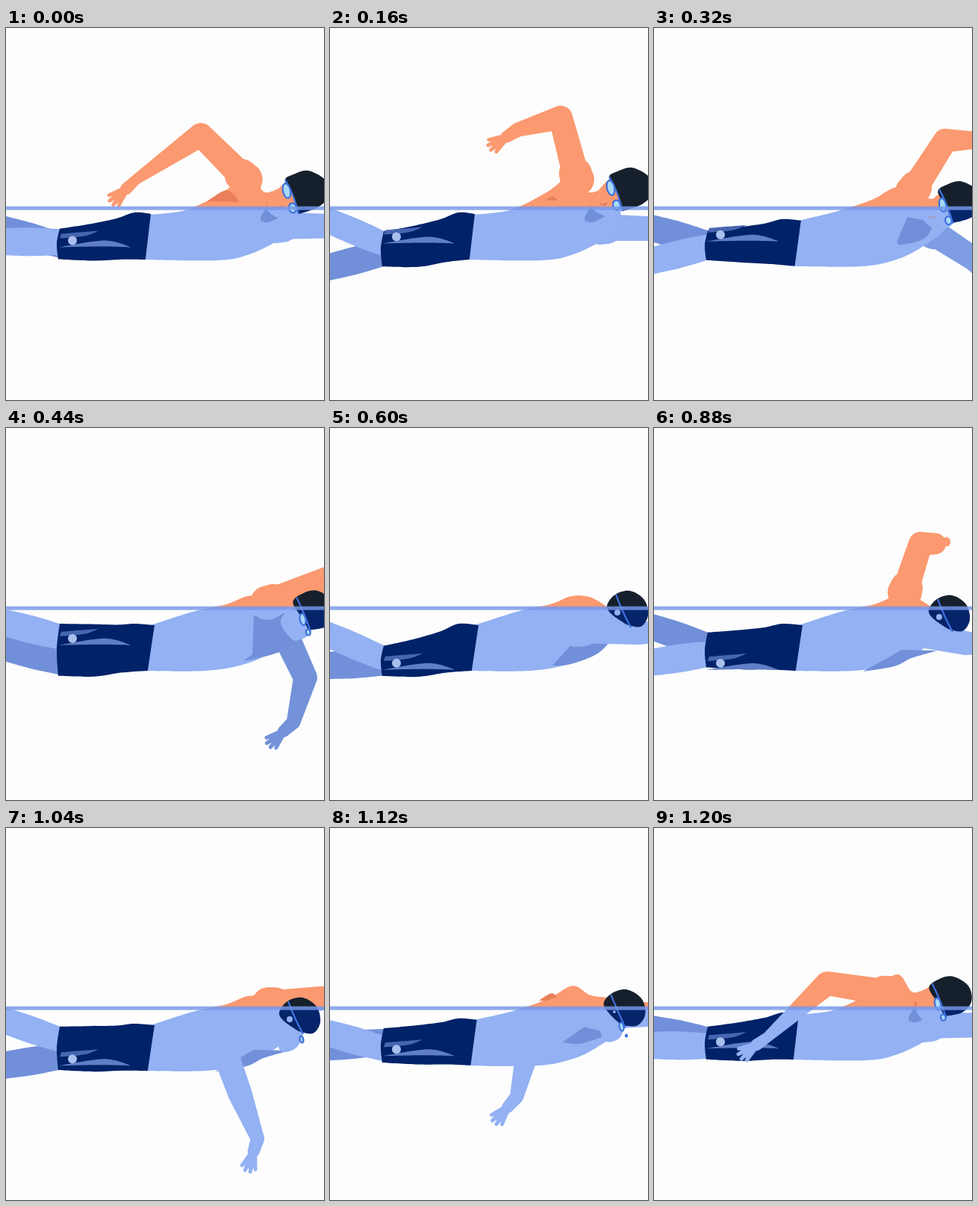
These frames come from a looping animation (426 by 498 pixels, 1240 ms). An HTML page:

```html
<!DOCTYPE html>
<html lang="en">
<head>
<meta charset="utf-8">
<title>Front crawl</title>
<style>
html, body { margin: 0; width: 100%; height: 100%; overflow: hidden; background: #fdfdfd; }
svg { display: block; width: 100vw; height: 100vh; }
</style>
</head>
<body>
<svg viewBox="0 0 426 498">
  <clipPath id="air"><rect width="426" height="241"/></clipPath>
  <clipPath id="sea"><rect y="241" width="426" height="257"/></clipPath>
  <g id="top" clip-path="url(#air)"></g>
  <g id="under" clip-path="url(#sea)"></g>
  <g id="goggles"></g>
  <rect y="238.700" width="426" height="5" fill="#7699ea" opacity=".82"/>
</svg>
<script>
const LOOP = 1240, STEP = 40, UPPER = 85;
const SKIN = '#fb9970', TAN = '#e9805a', BLUE = '#93b1f3', DEEP = '#7190d9', NAVY = '#002268';

// Key poses: time, shoulder x y, elbow from shoulder, wrist from elbow.
const nearArm = [
  [0, 321,203, -60,-60, -87,60],
  [160, 331,203, -22,-83, -57,16],
  [260, 342,214, 20,-80, 20,8],
  [440, 350,234, 79,-32, 65,-15],
  [600, 330,270, 85,4, 60,0],
  [880, 335,272, 83,16, 60,4],
  [990, 300,282, 48,70, 22,85],
  [1040, 285,277, 29,80, 23,59],
  [1120, 305,250, -40,48, -15,62],
  [1200, 316,221, -84,-13, -80,72]
];
const farArm = [
  [0, 362,265, 85,0, 60,2],
  [160, 362,267, 85,2, 60,2],
  [300, 368,270, 65,35, 45,45],
  [440, 372,272, 29,62, -16,60],
  [620, 320,260, -50,15, -60,10],
  [740, 328,232, -30,-65, -50,30],
  [880, 336,220, 21,-65, 20,0],
  [1040, 352,236, 80,-9, 60,0],
  [1200, 362,264, 85,0, 60,2]
];
// Time, x, y, turn away from the viewer, chin drop.
const headKeys = [
  [0, 403,220, 0,1], [160, 403,216, 0,1], [440, 413,245, .4,1], [600, 399,243, 1,0],
  [880, 396,249, 1,0], [1040, 394,252, 1,1], [1200, 397,226, .35,1]
];
// Time, near foot, far foot: -1 is up, 1 is down.
const kicks = [
  [0, -.1,-.7], [160, -1.1,1.1], [290, 1,-.8], [440, -1,.15], [500, -1,1],
  [600, -.45,1], [660, .75,1], [760, -1,-.3], [880, .86,-.8], [1040, -1.1,1], [1200, .07,-.7]
];

// Shapes as a pair: breathing side, face-down side.
const torso = [
  [184,250, 240,244, 290,220, 326,196, 347,220, 373,210, 392,262, 365,284, 326,303, 283,311, 180,310],
  [188,266, 250,246, 295,236, 324,225, 350,227, 375,242, 390,268, 354,300, 320,316, 268,325, 182,325]
];
const capShape = [
  [-29,-16, -18,-24, 2,-29, 25,-16, 29,5, 15,20, -11,29, -17,6],
  [-28,-5, -17,-20, 3,-25, 22,-13, 27,8, 17,23, -2,20, -21,7]
];
const faceShape = [
  [-31,-12, -19,-14, -9,20, -15,31, -31,37, -54,20],
  [-20,0, 2,20, -4,41, -22,48, -30,38, -32,4]
];
const strapShape = [[-29,-17, -17,3, -11,29], [-16,-20, -8,2, 4,24]];

const clamp = v => Math.min(1, Math.max(0, v));
const ease = (a, b, t) => { const u = clamp((t - a) / (b - a)); return u * u * (3 - 2 * u); };
const lerp = (a, b, k) => a + (b - a) * k;
const mix = ([a, b], k) => a.map((v, i) => lerp(v, b[i], k));
const shift = (v, x, y) => v.map((c, i) => c + (i % 2 ? y : x));

// Periodic spline through the rows that never overshoots a key.
function sample(rows, time) {
  const t = (time + LOOP) % LOOP, n = rows.length;
  const i = rows.findLastIndex(r => r[0] <= t);
  const at = k => rows[(k + n) % n];
  const [t0, t1, t2, t3] = [-1, 0, 1, 2].map(k => at(i + k)[0] + LOOP * Math.floor((i + k) / n));
  const h = t2 - t1, u = (t - t1) / h;
  const mean = (a, b) => a * b > 0 ? 2 * a * b / (a + b) : 0;
  return at(i).slice(1).map((b, c) => {
    const a = at(i - 1)[c + 1], e = at(i + 1)[c + 1], f = at(i + 2)[c + 1];
    const d = (e - b) / h;
    const m1 = mean((b - a) / (t1 - t0), d) * h, m2 = mean(d, (f - e) / (t3 - t2)) * h;
    return b + u * m1 + u * u * (3 * (e - b) - 2 * m1 - m2) + u * u * u * (2 * (b - e) + m1 + m2);
  });
}

const num = v => v.toFixed(2);

// Closed smooth outline; corners lists the points kept sharp.
function blob(v, corners = []) {
  const n = v.length / 2;
  const pt = k => { k = (k + n) % n; return [v[2 * k], v[2 * k + 1]]; };
  const slope = k => {
    if (corners.includes(k % n)) return [0, 0];
    const a = pt(k - 1), b = pt(k + 1);
    return [(b[0] - a[0]) / 6, (b[1] - a[1]) / 6];
  };
  let d = 'M' + pt(0).map(num);
  for (let k = 0; k < n; k++) {
    const a = pt(k), b = pt(k + 1), s = slope(k), e = slope(k + 1);
    d += 'C' + [a[0] + s[0], a[1] + s[1], b[0] - e[0], b[1] - e[1], ...b].map(num);
  }
  return d + 'Z';
}

function capsule(ax, ay, ra, bx, by, rb) {
  const len = Math.hypot(bx - ax, by - ay) || 1;
  const nx = (ay - by) / len, ny = (bx - ax) / len;
  const p = (x, y, r) => num(x + nx * r) + ' ' + num(y + ny * r);
  return `M${p(ax, ay, ra)}L${p(bx, by, rb)}A${rb} ${rb} 0 0 0 ${p(bx, by, -rb)}` +
    `L${p(ax, ay, -ra)}A${ra} ${ra} 0 0 0 ${p(ax, ay, ra)}Z`;
}

// A forearm pointing at the viewer is short and wide; the wrist bends in the pull.
function arm([sx, sy, ux, uy, fx, fy]) {
  const ex = sx + ux, ey = sy + uy, wx = ex + fx, wy = ey + fy;
  const len = Math.hypot(fx, fy), rw = 7 + 10 * clamp(1 - len / 100) ** 1.5;
  const hand = 45 * clamp(len / 50), dir = Math.atan2(fy, fx) + .2 + .5 * uy / UPPER;
  const px = wx + .4 * hand * Math.cos(dir), py = wy + .4 * hand * Math.sin(dir);
  let d = capsule(sx, sy, 23, sx + ux * .1, sy + uy * .1, 22) +
    capsule(sx, sy, 18, ex, ey, 16) + capsule(ex, ey, 16, wx, wy, rw) + capsule(wx, wy, rw, px, py, 8);
  for (let k = -1; k < 1.1; k += 2 / 3) {
    const a = dir + k * .4, reach = hand * (.62 - .08 * k * k);
    d += capsule(px, py, 4.5, px + reach * Math.cos(a), py + reach * Math.sin(a), 2.4);
  }
  return d;
}

function add(parent, tag, attrs) {
  const el = document.createElementNS('http://www.w3.org/2000/svg', tag);
  set(el, attrs);
  return parent.appendChild(el);
}
function set(el, attrs) { for (const k in attrs) el.setAttribute(k, attrs[k]); }

// One shape painted in its air colour and its water colour.
const [top_, under, goggles] = ['top', 'under', 'goggles'].map(id => document.getElementById(id));
const part = (air, sea) => [add(top_, 'path', { fill: air }), add(under, 'path', { fill: sea })];
const draw = (els, d) => els.forEach(el => set(el, { d }));

const farLegEl = part(TAN, DEEP), farArmEl = part(SKIN, BLUE), torsoEl = part(SKIN, BLUE);
const shadeEl = part(TAN, DEEP), nearLegEl = part(SKIN, BLUE), shortsEl = part(NAVY, NAVY);
const bandEl = part('#4766b0', '#4766b0'), swooshEl = part('#5f7ec6', '#5f7ec6');
const badge = add(under, 'circle', { cx: 89, r: 6, fill: '#a9bfee' });
const foldEl = part(TAN, BLUE), nearArmEl = part(SKIN, BLUE), faceEl = part(SKIN, BLUE);
const capEl = part('#16202c', '#06246a');

const line = { fill: 'none', stroke: '#3d70dc', 'stroke-width': 2.2 };
const mouth = add(goggles, 'path', { ...line, stroke: '#c9705f', 'stroke-width': 1.3, d: 'M-41 19q5 4 9-1' });
const strap = add(goggles, 'path', line);
const lenses = [0, 1].map(() => add(goggles, 'ellipse', { ...line, fill: '#a8d9f6' }));
const capDot = add(goggles, 'circle', { cx: -14, cy: 4, fill: BLUE });

function leg(hip, foot) {
  const mid = (hip + foot) / 2;
  return blob([75, hip - 17, 35, mid - 19, -5, foot - 18, -5, foot + 18, 35, mid + 19, 75, hip + 17], [0, 2, 3, 5]);
}

function drawHips(t, down) {
  const feet = sample(kicks, t), hips = sample(kicks, t + 55).map(k => 295 + 2 * down + 17 * k);
  [nearLegEl, farLegEl].forEach((el, i) => draw(el, leg(hips[i], 289 + 29 * feet[i])));

  const hemTop = Math.min(...hips) - 18, hemLow = Math.max(...hips) + 18;
  const waistTop = 249 + 15 * down, waistLow = 310 + 15 * down;
  const up = k => lerp(waistTop, hemTop, k), low = k => lerp(waistLow, hemLow, k);
  draw(shortsEl, blob([
    194 + 5 * down, waistTop, 187 + 3 * down, waistLow, 156, low(.35), 118, low(.85) + 2, 70, hemLow,
    68, (hemTop + hemLow) / 2, 72, hemTop, 110, up(.7), 148, up(.3), 172, waistTop - 2
  ], [0, 1, 4, 6]));

  // The print slides around the hips as the body rolls.
  const roll = .5 - .38 * Math.cos(2 * Math.PI * (t - 250) / LOOP);
  const y = lerp(hemTop, hemLow, roll);
  set(badge, { cy: y });
  draw(bandEl, blob([74, y - 9, 124, y - 13, 105, y - 6, 72, y - 3], [0, 1, 3]));
  draw(swooshEl, blob([71, y + 9, 132, y, 167, y + 9, 122, y + 8], [0, 2]));
}

function drawHead(t) {
  const [x, y, turn, drop] = sample(headKeys, t);
  draw(capEl, blob(shift(mix(capShape, turn), x, y), [6]));
  const chin = faceShape[1].map(v => v * drop);
  draw(faceEl, blob(shift(mix([faceShape[0], chin], turn), x, y)));

  set(goggles, { transform: `translate(${num(x)} ${num(y)})` });
  const [a, b, ...end] = mix(strapShape, turn).map(num);
  set(strap, { d: `M${a} ${b}Q${end}` });
  set(mouth, { opacity: clamp(1 - 3 * turn) });
  lenses.forEach((el, i) => {
    const cx = lerp([-19, -27][i], [8, 2][i], turn), cy = lerp([21, -2][i], [40, 31][i], turn);
    const size = lerp(1, .45 * drop * i, turn);
    set(el, {
      cx, cy, rx: 5 * size, ry: [6.5, 10][i] * size,
      transform: `rotate(-12 ${cx} ${cy})`, visibility: size > .1 ? 'visible' : 'hidden'
    });
  });
  set(capDot, { r: 4 * turn ** 3 });
}

function render(t) {
  const down = ease(180, 430, t) * (1 - ease(1050, 1195, t));
  const near = sample(nearArm, t), far = sample(farArm, t);
  drawHips(t, down);
  drawHead(t);
  draw(torsoEl, blob(mix(torso, down), [0, 5, 10]));
  draw(nearArmEl, arm(near));
  draw(farArmEl, arm(far));

  // The far side of the chest darkens while its arm pulls.
  const pull = clamp(1.3 * far[3] / UPPER);
  set(farArmEl[1], { fill: `color-mix(in srgb, ${DEEP} ${num(100 * pull)}%, ${BLUE})` });
  draw(shadeEl, blob(mix([
    [350,232, 372,250, 352,260, 341,256, 347,243],
    [332,297 - 48 * pull, 380,298 - 53 * pull, 345 + 40 * pull,308 - 18 * pull, 322,319 - 8 * pull, 280 + 53 * pull,326 - 24 * pull]
  ], down), [0, 1, 4]));

  // Armpit shadow, open while the elbow is behind the shoulder.
  const open = clamp(-near[2] / 60);
  draw(foldEl, blob(mix([[300,230, 300,230, 300,230], [270,232, 296,217, 313,233]], open), [0, 2]));
}

const start = performance.now();
function tick() {
  const t = (performance.now() - start) % LOOP;
  render(Math.floor(t / STEP) * STEP);
  requestAnimationFrame(tick);
}
tick();
</script>
</body>
</html>
```
